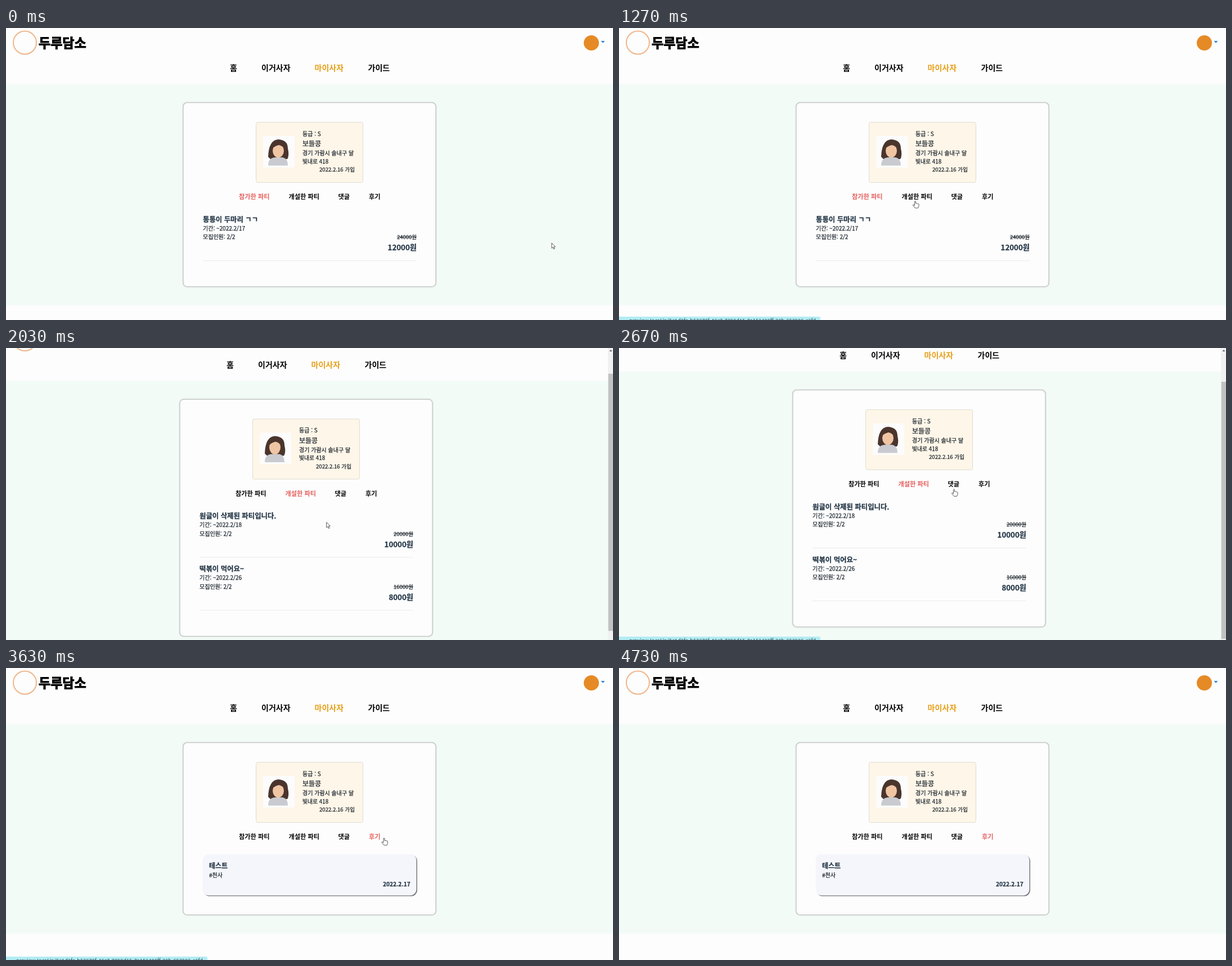
Recreate the animation shown at these times as an HTML page. Size 1079 by 519 pixels, loop 4760 ms.

```html
<!DOCTYPE html>
<html lang="ko">
<head>
<meta charset="utf-8">
<style>
  html, body { margin: 0; height: 100%; overflow: hidden; background: #fdfdfd; }
  svg { display: block; width: 100%; height: 100%; }
  text { font-family: "Noto Sans CJK KR", "Noto Sans CJK", sans-serif; white-space: pre; }
</style>
</head>
<body>
<svg viewBox="0 0 1079 519">
  <g id="page"></g>
  <g id="scrollbar">
    <path d="M1070 0H1079V519H1070Z" fill="#f1f1f1"/>
    <path d="M1072.5 6L1075 3L1077.5 6Z" fill="#606060"/>
    <rect id="thumb" x="1070.7" width="8.3" fill="#c1c1c1"/>
  </g>
  <g id="status">
    <path d="M0 513H355Q358 513 358 516V519H0Z" fill="#b3ecf3"/>
    <text x="18" y="524" font-size="9.3" fill="#35505a">preview.local/p/5c1d0fa-b52670f-46c7-7292d15-7a151480ff-20b-653986-c6fd</text>
  </g>
  <g id="cursor" fill="#fff" stroke="#333" stroke-width=".8" stroke-linejoin="round">
    <path id="arrow" d="M0 0V9.5L2.2 7.6L3.8 11L5.3 10.3L3.7 7H6.6Z"/>
    <path id="hand" d="M-1 1Q0-.8 1 1V5Q2 4 3 5Q4 4.3 5 5.4Q6.5 5 6.5 7V9.5L5 13H0L-4 8Q-4 6.6-2.6 7.2L-1 8.5Z"/>
  </g>
</svg>
<script>
const LOOP = 4760;
const INK = '#263848', DARK = '#1c252d';
const $ = id => document.getElementById(id);

// Text placed by its vertical centre; a thin outline thickens the strokes
const text = (x, y, size, str, {fill = DARK, weight = 500, end = false, outline = .25} = {}) =>
  `<text x="${x}" y="${y + size * .37}" font-size="${size}" font-weight="${weight}"` +
  ` fill="${fill}" stroke="${fill}" stroke-width="${outline}"` +
  ` text-anchor="${end ? 'end' : 'start'}">${str}</text>`;

const rect = (x, y, w, h, r, attrs) =>
  `<rect x="${x}" y="${y}" width="${w}" height="${h}" rx="${r}" ${attrs}/>`;

const bold = {fill: INK, weight: 700};
const boldEnd = {...bold, end: true};

function party(dy, title, until, full, price) {
  return `<g transform="translate(0 ${dy})">` +
    text(350, 340, 12.4, title, bold) +
    text(350, 356, 10, `기간: ~2022.2/${until}`) +
    text(350, 371.5, 10, '모집인원: 2/2') +
    text(730, 371.5, 9.5, full + '원', {end: true}) +
    '<path d="M695 371.5H730" stroke="#222b33" stroke-width=".9"/>' +
    text(730, 390.5, 13.3, price + '원', boldEnd) +
    '<path d="M350 413.5H730" stroke="#eaeaec"/></g>';
}

function note(dy, body) {
  return `<g transform="translate(0 ${dy})">` +
    rect(351.3, 332.3, 379.7, 73.3, 11, 'fill="#77777c"') +
    rect(349.5, 331, 380, 73.2, 11, 'fill="#f5f6fb"') +
    body + text(718.7, 384, 10.2, '2022.2.17', boldEnd) + '</g>';
}

const comment = (dy, str) => note(dy, text(361, 349.3, 10, str));

const VIEWS = [
  {cardEnd: 460, bgEnd: 493,
   body: party(0, '통통이 두마리 ㄱㄱ', 17, 24000, 12000)},
  {cardEnd: 554, bgEnd: 600, thumb: 457,
   body: party(0, '원글이 삭제된 파티입니다.', 18, 20000, 10000) +
         party(94, '떡볶이 먹어요~', 26, 16000, 8000)},
  {cardEnd: 524, bgEnd: 600, thumb: 482,
   body: comment(0, '오 괜찮은데요?!') + comment(84.5, '이거 맛있어요?!')},
  {cardEnd: 439, bgEnd: 472,
   body: note(0, text(361, 351.5, 12, '테스트', bold) + text(361, 368, 10, '#천사'))},
];

const MENU = [[398, '홈'], [454, '이거사자'], [548.5, '마이사자'], [643.5, '가이드']];
const TABS = [[414, '참가한 파티'], [502.5, '개설한 파티'], [590.5, '댓글'], [645, '후기']];

const profile =
  rect(444.5, 167.5, 190, 107, 3, 'fill="#fef6e8" stroke="#dfdcd2"') +
  rect(457, 192, 56, 56, 0, 'fill="#fcfcfc"') +
  '<path d="M466 229Q467 199 484 198Q501 199 501 214Q504 227 500 233H470Z" fill="#4a352d"/>' +
  '<path d="M466 244.5Q466 231 478 230H492Q501 232 501 244.5Z" fill="#c9cbd0"/>' +
  '<ellipse cx="484" cy="218" rx="10" ry="12.5" fill="#f0c5a4"/>' +
  '<path d="M472 218Q473 204 485 203Q496 204 496 217Q492 209 485 208Q475 210 472 218Z" fill="#4a352d"/>' +
  text(527, 188, 10, '등급 : S') +
  text(527, 206, 12, '보들콩') +
  text(527, 222.5, 10, '경기 가람시 솔내구 달') +
  text(527, 237, 9.8, '빛내로 418') +
  text(620, 251.5, 9.6, '2022.2.16 가입', {end: true});

function pageMarkup(index) {
  const view = VIEWS[index], dx = view.thumb ? -6 : 0;
  const cardBox = [315, 132.7, 449, view.cardEnd - 133, 7];
  return rect(0, 99.5, 1079, view.bgEnd - 99.5, 0, 'fill="#f3fbf7"') +
    '<circle cx="33.5" cy="26" r="20.5" fill="none" stroke="#efb58a" stroke-width="2"/>' +
    text(58, 26.5, 23, '두루담소', {fill: '#000', weight: 900, outline: 1}) +
    `<g transform="translate(${2 * dx})"><circle cx="1040.5" cy="26.5" r="13.5" fill="#e58a25"/>` +
    '<path d="M1057.5 23H1064.5L1061 26.7Z" fill="#2484e6"/></g>' +
    `<g transform="translate(${dx})">` +
    MENU.map(([x, s], i) =>
      text(x, 71, 14, s, {fill: i === 2 ? '#e8a01a' : '#000', weight: 700, outline: 0})).join('') +
    rect(...cardBox, 'fill="none" stroke="#000" stroke-opacity=".06" stroke-width="4"') +
    rect(...cardBox, 'fill="#fdfdfd" stroke="#c3c5c6" stroke-width="1.3"') +
    profile +
    TABS.map(([x, s], i) =>
      text(x, 300, 11.2, s, {fill: i === index ? '#e65f5d' : '#000', weight: 700, outline: 0})).join('') +
    view.body + '</g>';
}

const clamp = v => Math.min(1, Math.max(0, v));
const ramp = (t, from, to) => clamp((t - from) / (to - from));
const ease = p => p * p * (3 - 2 * p);

const SWITCHES = [1330, 2830, 3520];
const HANDS = [[900, 1760], [2480, 2960], [3290, 4330]];
const HOVERS = [[980, 1930], [2520, 2990], [3340, 4330]];

// Pointer stops: time, x, y
const PATH = [
  [0, 970, 382], [260, 970, 382], [950, 526.5, 307], [1560, 526.5, 307],
  [1850, 569.7, 309.7], [2200, 569.7, 309.7], [2550, 595.5, 250.5], [2860, 595.5, 250.5],
  [3120, 624, 289], [3190, 624, 289], [3400, 672, 302], [3980, 672, 302],
  [4290, 586, 260], [4640, 520, 530], [LOOP, 520, 530],
];

function pointer(t) {
  const i = PATH.findIndex(p => p[0] > t);
  const [t0, x0, y0] = PATH[i - 1], [t1, x1, y1] = PATH[i];
  const p = ease(ramp(t, t0, t1));
  return [x0 + (x1 - x0) * p, y0 + (y1 - y0) * p];
}

let shown = -1;
function draw(t) {
  const index = SWITCHES.filter(s => t >= s).length;
  const view = VIEWS[index];
  if (index !== shown) $('page').innerHTML = pageMarkup(shown = index);

  const scroll = index === 1 ? 58 * ease(ramp(t, 1850, 2130)) : 0;
  $('page').setAttribute('transform', `translate(0 ${-scroll})`);
  $('scrollbar').style.display = view.thumb ? '' : 'none';
  $('thumb').setAttribute('y', 10 + scroll * 50 / 58);
  $('thumb').setAttribute('height', view.thumb || 0);

  $('status').style.opacity = Math.max(...HOVERS.map(([a, b]) =>
    Math.min(ramp(t, a, a + 100), 1 - ramp(t, b, b + 100))));

  const hand = HANDS.some(([a, b]) => t >= a && t < b);
  $('hand').style.display = hand ? '' : 'none';
  $('arrow').style.display = hand ? 'none' : '';
  $('cursor').setAttribute('transform', `translate(${pointer(t)})`);
}

const start = performance.now();
function tick() {
  draw((performance.now() - start) % LOOP);
  requestAnimationFrame(tick);
}
tick();
</script>
</body>
</html>
```
